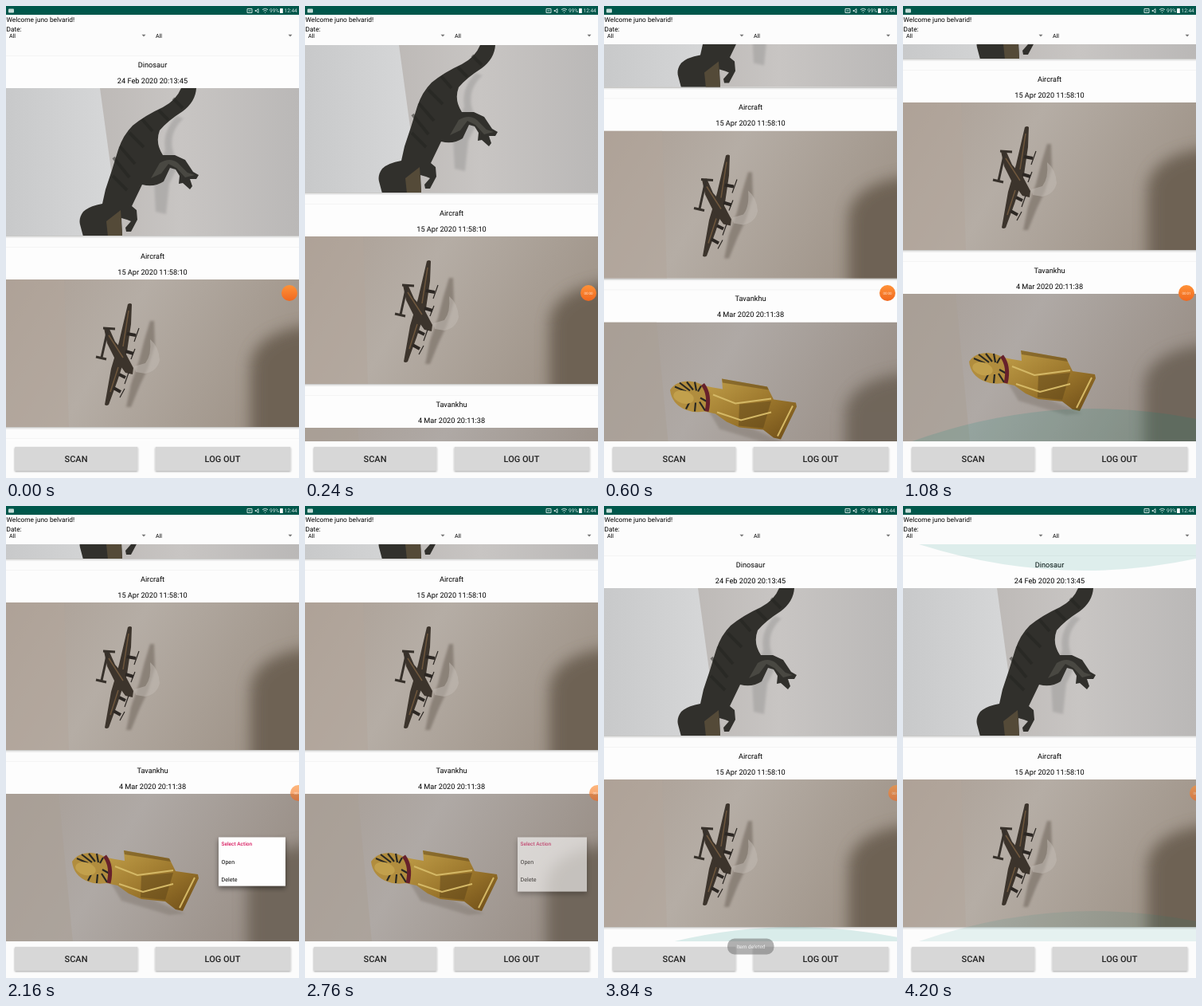
An HTML page for the animation above (4320 ms loop, 368 px wide and 592 px high).

```html
<!DOCTYPE html>
<html lang="en">
<head>
<meta charset="utf-8">
<title>Scan list</title>
<style>
html, body { margin: 0; width: 100%; height: 100%; overflow: hidden; background: #fcfcfc; }
#stage { display: block; width: 368px; height: 592px; font: 8.3px Roboto, sans-serif; text-rendering: geometricPrecision; }
.card text { font-size: 9.2px; text-anchor: middle; }
.button text { font-size: 11px; font-weight: 500; text-anchor: middle; fill: #222; }
.small { font-size: 7.1px; }
.tiny { font-size: 6.5px; }
</style>
</head>
<body>
<svg id="stage" viewBox="0 0 368 592">
  <defs>
    <clipPath id="window"><path d="M0 48h368v498H0z"/></clipPath>
    <filter id="soft" x="-50%" y="-50%" width="200%" height="200%"><feGaussianBlur stdDeviation="9"/></filter>
    <filter id="haze" x="-50%" y="-50%" width="200%" height="200%"><feGaussianBlur stdDeviation="1.5"/></filter>
    <filter id="drop" x="-20%" y="-20%" width="140%" height="150%"><feDropShadow dx="0" dy="3" stdDeviation="3" flood-opacity=".45"/></filter>
    <filter id="lift" x="-5%" y="-10%" width="110%" height="130%"><feDropShadow dx="0" dy="1" stdDeviation=".9" flood-opacity=".35"/></filter>
    <linearGradient id="grayWall"><stop stop-color="#c8c9ca"/><stop offset="1" stop-color="#d6d7d8"/></linearGradient>
    <linearGradient id="grayRoom"><stop offset=".2" stop-color="#b9b5b2"/><stop offset=".6" stop-color="#c8c5c3"/><stop offset="1" stop-color="#bab8b7"/></linearGradient>
    <linearGradient id="tanRoom" y2=".3"><stop stop-color="#aa9e94"/><stop offset=".45" stop-color="#b5ada5"/><stop offset="1" stop-color="#a1968b"/></linearGradient>
    <linearGradient id="paleRoom" y2=".3"><stop stop-color="#a79d95"/><stop offset=".45" stop-color="#afa9a5"/><stop offset="1" stop-color="#9b9189"/></linearGradient>
    <linearGradient id="gold" y2="1"><stop stop-color="#c2a04a"/><stop offset=".55" stop-color="#9a752b"/><stop offset="1" stop-color="#6d4c17"/></linearGradient>
    <linearGradient id="orange" x2="0" y2="1"><stop stop-color="#ff9238"/><stop offset="1" stop-color="#f0681f"/></linearGradient>
  </defs>

  <path fill="#fcfcfc" d="M0 0h368v592H0z"/>
  <g clip-path="url(#window)">
    <g id="list">
      <g class="card" id="dinosaur">
        <svg y="103" width="368" height="185" viewBox="0 103 368 185">
          <path fill="url(#grayRoom)" d="M0 103h368v186H0z"/>
          <path fill="url(#grayWall)" d="M0 103h118l15 110-12 76H0z"/>
          <path fill="#8f8e8d" opacity=".4" filter="url(#haze)" d="M214 138q-18 20-14 42l-14 40 2 38 13 3 4-38 10-20-6-24q-4-22 14-38z"/>
          <path fill="#31302c" d="M220 103Q214 118 197 127Q175 137 159 150Q147 162 141 180L133 206 125 230 121 248Q104 251 97 258Q91 266 93 274L97 289H146L145 266 152 268 157 270 150 278 151 283 157 283 165 268 164 256 158 251 171 224Q186 228 198 220L206 203 213 205 218 213 217 223 222 222 231 230 234 226 231 217 239 217 242 212 235 208 225 193 212 187 197 187Q187 172 193 156Q203 144 222 132Q238 120 239 103Z"/>
          <path fill="#544a38" d="M126 270l18-14 2 33h-18z"/>
          <path fill="#494842" d="M193 197q13-8 23 0l12 12 9 3-12 3-11-12-10-5-9 12-13 6z"/>
          <path fill="none" stroke="#22221f" stroke-width="4" opacity=".5" d="M210 116l12 12m-30 3l12 12m-33-1l13 15m-29 2l18 18m-30-1l19 22m-27-8l20 25m-21-2l18 18"/>
        </svg>
        <text x="184" y="76.5">Dinosaur</text>
        <text x="184" y="96.7">24 Feb 2020 20:13:45</text>
      </g>
      <g class="card">
        <svg y="343" width="368" height="185" viewBox="0 343 368 185">
          <path fill="url(#tanRoom)" d="M0 343h368v186H0z"/>
          <path fill="#b3a69c" opacity=".55" d="M0 343h73l6 186H0z"/>
          <path fill="#695d50" opacity=".9" filter="url(#soft)" d="M307 560V452q4-52 110-54v172z"/>
          <path fill="#857b72" opacity=".85" filter="url(#haze)" d="M181 395l5 0 1 30-9 30-10 21-11 27-6 0 6-29 10-29 7-27z"/>
          <path fill="#c2bab3" opacity=".55" d="M181 418q11 9 12 26-3 14-18 17l-12-2-2-7 14-4q8-10 6-30z"/>
          <g fill="#3c342c">
            <path d="M153 374q3-2 5 0l-1 25-5 34-12 37-11 30q-3 2-5 0l8-45 10-34z"/>
            <path d="M123 404l6-1 8 18 14 16 9 17-1 8-9-2-14-19-9-18z"/>
          </g>
          <path fill="none" stroke="#37312b" stroke-width="3" d="M122 404l15 1m-9 0l-8 36m-7-1l13 3"/>
          <path fill="none" stroke="#2c2723" stroke-width="4" d="M152 411l11 2m-13 20l10 3m-18 26l8 4m-15 13l9 5"/>
          <path fill="none" stroke="#2c2723" stroke-width="1.2" d="M167 404l-6 17m1 9l-5 13m-3 17l-5 14m0 6l-6 11"/>
          <path fill="none" stroke="#6f573d" stroke-width="1.5" d="M154 382l-7 45m-6 26l-10 31m-2-71l18 28"/>
        </svg>
        <text x="184" y="316.7">Aircraft</text>
        <text x="184" y="336.7">15 Apr 2020 11:58:10</text>
      </g>
      <g class="card" id="statue">
        <svg y="583" width="368" height="185" viewBox="0 361 368 185">
          <path fill="url(#paleRoom)" d="M0 361h368v186H0z"/>
          <path fill="#aba097" opacity=".6" d="M0 361h66l18 186H0z"/>
          <path fill="#695e53" opacity=".85" filter="url(#soft)" d="M303 580V475q5-50 110-52v167z"/>
          <path fill="#837a72" opacity=".5" filter="url(#haze)" d="M130 470l80 35 15 6-20 2-60-18z"/>
          <path fill="url(#gold)" d="M122 440l15 3 12 2-1-13 57 10 8 16 28 4 1 5-20 41-9-2-13-10-30-3-16-7-14-10-18-4z"/>
          <path fill="#5e4519" d="M170 464l40-4-10 34-31-3zM148 432l57 10 2 4-58-9z" opacity=".5"/>
          <path fill="none" stroke="#d4b866" stroke-width="2" d="M137 452l28 11 45-6m-68 17l30 10 38-10m27-8l-19 38"/>
          <path fill="#b18d3e" d="M83 446q7-11 24-11 20 2 28 16l-4 21q-16 4-28-1-18-7-20-25z"/>
          <path fill="none" stroke="#292823" stroke-width="2.2" d="M89 442l14 6m-8-11l13 10m-4-11l8 10m2-10l2 11m6-6l-4 7m-11 14l-4 8m12-8l-1 11m6-12l7 11m-6-16l9 5"/>
          <ellipse cx="100" cy="455" rx="13" ry="8" fill="#c2a04c" transform="rotate(15 100 455)"/>
          <path fill="none" stroke="#67212b" stroke-width="5" d="M124 439q10 13 5 34"/>
        </svg>
        <text x="184" y="556.7">Tavankhu</text>
        <text x="184" y="576.7">4 Mar 2020 20:11:38</text>
      </g>
    </g>
    <path id="topGlow" fill="#008577"/>
    <path id="bottomGlow" fill="#008577"/>
  </g>

  <path fill="#00574b" d="M0 0h368v11H0z"/>
  <rect x="3" y="3.5" width="7" height="5" rx="1" fill="#c5dcd8"/>
  <g fill="none" stroke="#c9deda">
    <path d="M303 3.5h6v5h-6zM304.5 6h3M313 5.5h1.5l2.5-2v5l-2.5-2H313z"/>
    <path d="M322 4.5q3.500-2.500 7 0M323.500 6.300q2-1.500 4 0M325 8.300h1"/>
  </g>
  <rect x="344" y="3" width="3.800" height="6" rx=".6" fill="#fff"/>
  <text class="tiny" x="331" y="8.400" fill="#d5e5e2">99%</text>
  <text class="tiny" x="349.500" y="8.400" fill="#d5e5e2">12:44</text>

  <text x=".5" y="20.300">Welcome juno belvarid!</text>
  <text x=".5" y="32">Date:</text>
  <text class="small" x="4" y="39.700">All</text>
  <text class="small" x="188" y="39.700">All</text>
  <path fill="#777" d="M170.500 35.800h5l-2.500 2.700zM354.500 35.800h5l-2.500 2.700z"/>

  <g class="button">
    <rect x="11" y="553" width="154.500" height="30" rx="1" fill="#d7d7d7" filter="url(#lift)"/>
    <rect x="187.500" y="553" width="170" height="30" rx="1" fill="#d7d7d7" filter="url(#lift)"/>
    <text x="88" y="572">SCAN</text>
    <text x="272" y="572">LOG OUT</text>
  </g>

  <g id="menu">
    <rect id="menuBox" x="267" y="415.500" fill="#fefefe" filter="url(#drop)"/>
    <text class="tiny" x="270.500" y="426" fill="#d81b60" font-weight="500">Select Action</text>
    <text class="small" x="270.500" y="448.700">Open</text>
    <text class="small" x="270.500" y="470.700">Delete</text>
  </g>
  <g id="toast">
    <rect x="155" y="542.500" width="58.500" height="20" rx="9" fill="#666"/>
    <text class="tiny" x="184.500" y="554.700" fill="#eee" text-anchor="middle">Item deleted</text>
  </g>
  <g id="bubble">
    <circle cy="360" r="10" fill="url(#orange)"/>
    <text id="timer" y="361.600" font-size="4.500" fill="#ffe2cf" text-anchor="middle"></text>
  </g>
</svg>
<script>
const LOOP = 4320, STEP = 120;
const el = id => document.getElementById(id);
const set = (id, attrs) => {
  for (const name in attrs) el(id).setAttribute(name, attrs[name]);
};

// Linear interpolation through [time, value] points
function track(t, ...points) {
  let [t0, v0] = points[0];
  if (t <= t0) return v0;
  for (const [t1, v1] of points) {
    if (t < t1) return v0 + (v1 - v0) * (t - t0) / (t1 - t0);
    [t0, v0] = [t1, v1];
  }
  return v0;
}

// Card backs with a hairline on top and a shadow under the picture
document.querySelectorAll('.card').forEach((card, i) => {
  const y = 62 + 240 * i;
  card.insertAdjacentHTML('afterbegin',
    `<path fill="#fdfdfd" d="M0 ${y}h368v226H0z"/>
     <path fill="#f4f4f4" d="M0 ${y}h368v1H0z"/>
     <path fill="#c9c9c7" d="M0 ${y + 226}h368v1.500H0z"/>
     <path fill="#ededed" d="M0 ${y + 227.5}h368v1.500H0z"/>`);
});

function glow(id, cx, edge, height, fullHeight, fullHalf, opacity) {
  const half = fullHalf * Math.sqrt(Math.abs(height / fullHeight));
  set(id, { d: `M${cx - half} ${edge}Q${cx} ${edge + 2 * height} ${cx + half} ${edge}Z`, opacity });
}

function draw(t) {
  const deleted = t >= 2880;
  const scroll = deleted ? 0 : track(t, [0, 0], [120, 12], [240, 54], [360, 104],
    [480, 151], [600, 186.500], [720, 207], [840, 218], [960, 222]);
  set('list', { transform: `translate(0 ${-scroll})` });
  set('statue', { visibility: deleted ? 'hidden' : 'visible' });

  const pull = deleted
    ? track(t, [3720, 0], [3840, 18], [3960, 38])
    : track(t, [840, 0], [960, 25], [1080, 41], [1200, 36], [1320, 28], [1680, 0]);
  const pullAlpha = deleted
    ? track(t, [3960, .14], [4200, .09])
    : track(t, [1080, .15], [1680, 0]);
  glow('bottomGlow', 240, 546, -pull, 38, 220, pullAlpha);
  glow('topGlow', 228, 48, track(t, [3960, 0], [4080, 20], [4200, 33]), 33, 208, .12);

  set('menu', {
    opacity: t >= 2160 && !deleted ? track(t, [2640, 1], [2760, .6]) : 0
  });
  set('menuBox', {
    width: track(t, [2160, 84], [2400, 87]),
    height: track(t, [2160, 61], [2400, 68])
  });
  set('toast', {
    opacity: t < 3600
      ? track(t, [2880, 0], [3000, .3], [3120, .65], [3240, .95], [3360, 1])
      : track(t, [3720, 1], [3840, .5], [3960, 0])
  });

  set('bubble', {
    transform: `translate(${track(t, [1320, 356], [1560, 367], [3840, 367], [4200, 370])} 0)`,
    opacity: track(t, [1320, 1], [1680, .65])
  });
  el('timer').textContent = t < 240 ? '' : '00:0' + Math.floor(t / 1000);
}

function tick() {
  const t = performance.now() % LOOP;
  draw(Math.floor(t / STEP) * STEP);
  requestAnimationFrame(tick);
}
tick();
</script>
</body>
</html>
```
